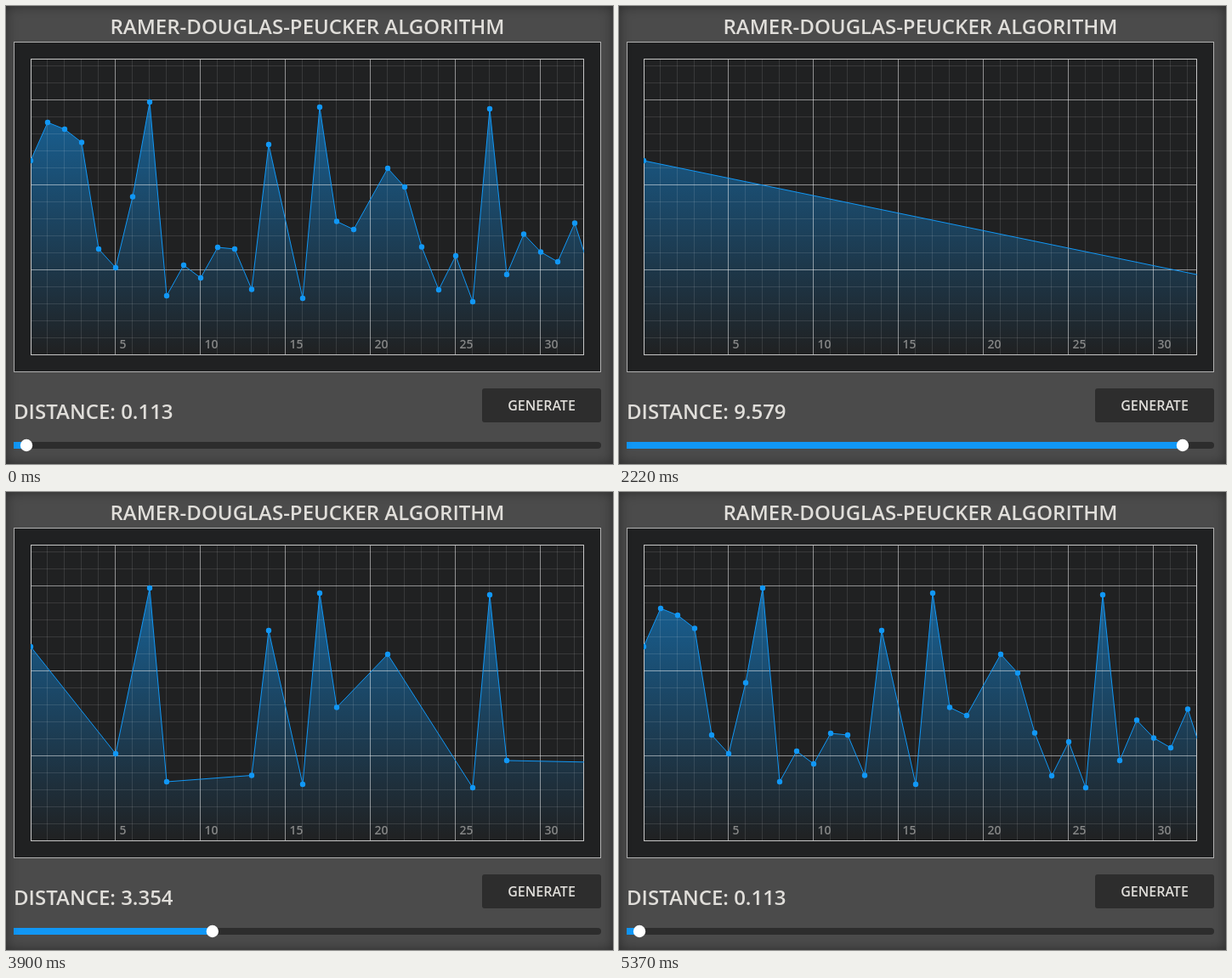
These frames come from a looping animation (714x539 px, 5400 ms). An HTML page:

```html
<!DOCTYPE html>
<html lang="en">
<head>
<meta charset="utf-8">
<title>Line simplification</title>
<style>
html, body { margin: 0; width: 100%; height: 100%; overflow: hidden; background: #4b4b4b; }
svg { display: block; width: 714px; height: 539px; }
.shade { position: absolute; inset: 0; box-shadow: inset 0 0 14px rgba(0, 0, 0, .42); pointer-events: none; }
text { font-family: "Open Sans", "Noto Sans", sans-serif; font-weight: 600; font-size: 24px; fill: #e0deda; }
.mid { text-anchor: middle; }
.button { font-size: 16px; }
#labels text { font-size: 14px; fill: #858686; }
path, .frame { fill: none; }
</style>
</head>
<body>
<svg viewBox="0 0 714 539">
  <defs>
    <linearGradient id="fade" gradientUnits="userSpaceOnUse" x1="0" y1="62" x2="0" y2="410">
      <stop offset="0" stop-color="#1197f5" stop-opacity=".65"/>
      <stop offset="1" stop-color="#1197f5" stop-opacity="0"/>
    </linearGradient>
    <clipPath id="plot"><rect x="29" y="62" width="651" height="349"/></clipPath>
  </defs>
  <text class="mid" x="354.5" y="33">RAMER-DOUGLAS-PEUCKER ALGORITHM</text>
  <rect x="9.5" y="42.5" width="690" height="388" fill="#202122" stroke="#b2b2b2"/>
  <g clip-path="url(#plot)">
    <path id="area" style="fill:url(#fade)"/>
    <path id="minor" stroke="#fff" stroke-opacity=".11"/>
    <path id="major" stroke="#fff" stroke-opacity=".5"/>
  </g>
  <g id="labels"></g>
  <rect class="frame" x="29.5" y="62.5" width="650" height="348" stroke="#c6c6c6"/>
  <g clip-path="url(#plot)">
    <path id="line" stroke="#1197f5"/>
    <path id="dots" stroke="#1197f5" stroke-width="6.4" stroke-linecap="round"/>
  </g>
  <text id="distance" x="9" y="486"></text>
  <rect x="560" y="450" width="140" height="40" rx="3" fill="#2d2d2d"/>
  <text class="mid button" x="630" y="476">GENERATE</text>
  <rect x="9" y="513" width="691" height="8" rx="4" fill="#2d2d2d"/>
  <rect id="filled" x="9" y="513" height="8" fill="#1197f5"/>
  <circle id="knob" cy="517" r="7.2" fill="#fff"/>
</svg>
<div class="shade"></div>
<script>
const $ = id => document.getElementById(id);
const LOOP = 5400, STEP = 30, UNIT = 20, LEFT = 29, BASE = 410;

const heights = [
  182, 137, 145, 160.5, 286, 308, 224.5, 113, 341, 305, 320, 284, 286, 333.5, 163, 253.5, 344,
  119, 253.5, 263, 227, 191, 213, 283.5, 334, 294, 348, 121, 316, 268.5, 289.5, 301, 255.5, 318
];
const points = heights.map((y, i) => [LEFT + UNIT * i, y]);

// Dragged slider value: time in ms, distance
const drag = [
  [0, .113], [810, 3.342], [1650, 6.957], [1710, 7.26], [2220, 9.579], [2340, 9.905],
  [2850, 7.15], [3390, 5.224], [3990, 3.1], [4440, 2.201], [5370, .113]
];
const rates = drag.slice(1).map(([t, v], i) => (v - drag[i][1]) / (t - drag[i][0]));
const slopes = drag.map((_, i) => {
  const a = rates[i - 1] ?? rates[i], b = rates[i] ?? a;
  return a * b > 0 ? 2 * a * b / (a + b) : 0;
});

// Monotone cubic through the drag table
function distanceAt(t) {
  if (t >= 5370) return .113;
  const i = drag.findIndex(d => d[0] > t) - 1;
  const [t0, v0] = drag[i], [t1, v1] = drag[i + 1];
  const h = t1 - t0, s = (t - t0) / h, r = 1 - s;
  return v0 * (1 + 2 * s) * r * r + v1 * s * s * (3 - 2 * s)
    + h * s * r * (slopes[i] * r - slopes[i + 1] * s);
}

function simplify(first, last, limit) {
  const [ax, ay] = points[first], [bx, by] = points[last];
  const dx = bx - ax, dy = by - ay, length = Math.hypot(dx, dy) * UNIT;
  let far = 0, split = first;
  for (let i = first + 1; i < last; i++) {
    const [x, y] = points[i];
    const d = Math.abs(dx * (y - ay) - dy * (x - ax)) / length;
    if (d > far) { far = d; split = i; }
  }
  if (far <= limit) return [points[first], points[last]];
  return [...simplify(first, split, limit), ...simplify(split, last, limit).slice(1)];
}

function buildGrid() {
  let minor = "", major = "";
  for (let i = 1; i <= 32; i++) {
    const x = LEFT - .5 + UNIT * i, d = `M${x} 62V410`;
    if (i % 5) { minor += d; continue; }
    major += d;
    $("labels").insertAdjacentHTML("beforeend", `<text x="${x + 5}" y="403">${i}</text>`);
  }
  for (let i = 1; i <= 17; i++) {
    const d = `M29 ${BASE + .5 - UNIT * i}H680`;
    if (i % 5) minor += d; else major += d;
  }
  $("minor").setAttribute("d", minor);
  $("major").setAttribute("d", major);
}

function draw(time) {
  const t = Math.floor(time % LOOP / STEP) * STEP;
  const value = distanceAt(t), knob = 16.4 + 67.5 * value;
  const kept = simplify(0, points.length - 1, value);
  const line = "M" + kept.map(p => p.join(" ")).join("L");
  $("line").setAttribute("d", line);
  $("area").setAttribute("d", `${line}V${BASE}H${LEFT}Z`);
  $("dots").setAttribute("d", kept.map(([x, y]) => `M${x} ${y}h.01`).join(""));
  $("distance").textContent = "DISTANCE: " + value.toFixed(3);
  $("knob").setAttribute("cx", knob);
  $("filled").setAttribute("width", knob - 9);
}

buildGrid();
const start = performance.now();
function tick() {
  draw(performance.now() - start);
  requestAnimationFrame(tick);
}
tick();
</script>
</body>
</html>
```
